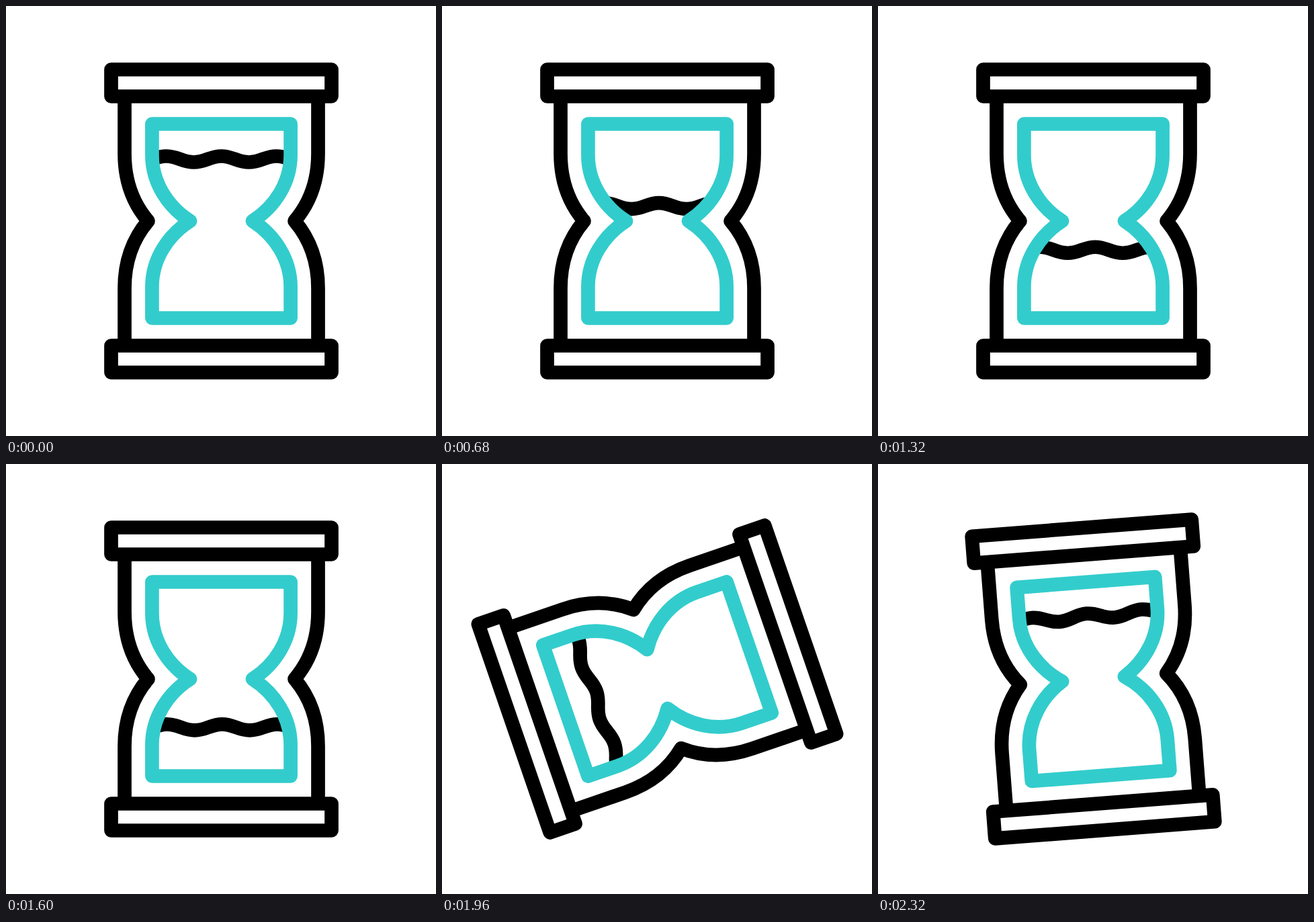
Recreate the animation shown at these times as an HTML page. Size 640 by 640 pixels, loop 2360 ms.

```html
<!DOCTYPE html>
<html lang="en">
<head>
<meta charset="utf-8">
<title>Hourglass</title>
<style>
  html, body { margin: 0; width: 100%; height: 100%; overflow: hidden; background: #fff; }
  svg { display: block; width: 100%; height: 100%; }
  .line { fill: none; stroke: #000; stroke-width: 20.7; stroke-linejoin: round; }
  .glass { stroke: #3cc; }
</style>
</head>
<body>
<svg viewBox="0 0 640 640">
  <defs>
    <path id="bulb" d="M-103.1-144.5V-98C-103.1-57-79.5-21-46.5 0C-79.5 21-103.1 57-103.1 98V144.5
      H103.1V98C103.1 57 79.5 21 46.5 0C79.5-21 103.1-57 103.1-98V-144.5Z"/>
    <path id="side" d="M-144-185.5V-100C-144-62-132-27-109 0C-132 27-144 62-144 100V185.5"/>
    <path id="cap" d="M-164-225.5H164V-185.5H-164Z"/>
    <clipPath id="inside"><use href="#bulb"/></clipPath>
    <path id="fall" d="M0 0C0 0 6.8 141.3 0 172"/>
    <path id="drift" d="M0 172C-6.8 202.7-41 184-41 184"/>
  </defs>
  <g id="hourglass" class="line" transform="translate(320.5 320)">
    <use href="#side"/>
    <use href="#side" transform="scale(-1 1)"/>
    <use href="#cap"/>
    <use href="#cap" transform="scale(1 -1)"/>
    <g clip-path="url(#inside)">
      <path id="wave" d="M-164-96.5c17 0 24 9 41 9s24-9 41-9s24 9 41 9s24-9 41-9s24 9 41 9s24-9 41-9s24 9 41 9s24-9 41-9"/>
    </g>
    <use href="#bulb" class="glass"/>
  </g>
</svg>
<script>
  const LOOP = 2360, TURN = 1680;
  const [hourglass, wave, fall, drift] =
    ['hourglass', 'wave', 'fall', 'drift'].map(id => document.getElementById(id));

  // cubic-bezier(1/6, 0, 5/6, 1), solved by bisection
  function ease(x) {
    let lo = 0, hi = 1;
    for (let i = 0; i < 24; i++) {
      const s = (lo + hi) / 2;
      if (s * (0.5 + s * (1.5 - s)) < x) lo = s; else hi = s;
    }
    return lo * lo * (3 - 2 * lo);
  }

  const along = (path, p) => path.getPointAtLength(p * path.getTotalLength());

  function draw(t) {
    const turn = Math.max(0, (t - TURN) / (LOOP - TURN));
    const pos = turn ? along(drift, turn) : along(fall, t / TURN);
    wave.setAttribute('transform', `translate(${pos.x} ${pos.y})`);
    hourglass.setAttribute('transform', `translate(320.5 320) rotate(${180 * ease(turn)})`);
  }

  let start;
  function tick(now) {
    start ??= now;
    draw((now - start) % LOOP);
    requestAnimationFrame(tick);
  }
  draw(0);
  requestAnimationFrame(tick);
</script>
</body>
</html>
```
